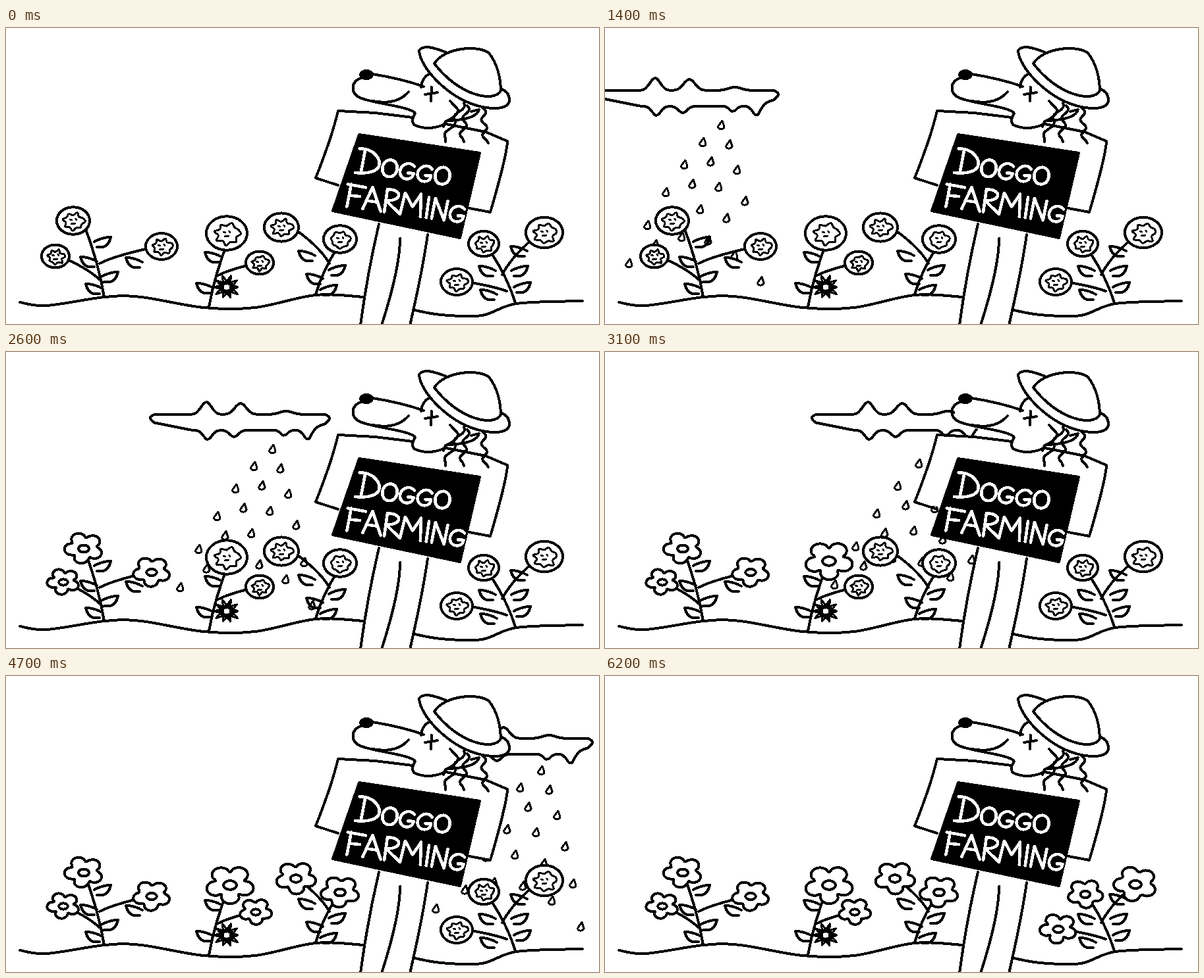
Recreate the animation shown at these times as an HTML page. Size 900 by 450 pixels, loop 6300 ms.

```html
<!DOCTYPE html>
<html lang="en">
<head>
<meta charset="utf-8">
<title>Doggo Farming</title>
<style>
  html, body { margin: 0; width: 100%; height: 100%; overflow: hidden; background: #fff; }
  svg { display: block; width: 900px; height: 450px; shape-rendering: crispEdges; }
  path, ellipse { fill: none; stroke: #000; stroke-width: 4; stroke-linecap: round; stroke-linejoin: round; }
  .paper { fill: #fff; }
  .blank { fill: #fff; stroke: none; }
  .ink { fill: #000; }
  .thin { stroke-width: 3; }
  .chalk { stroke: #fff; stroke-width: 4.6; vector-effect: non-scaling-stroke; }
</style>
</head>
<body>
<svg viewBox="0 0 900 450" role="img" aria-label="Doggo Farming">
  <g id="cloud"></g>
  <g id="rainA"></g>
  <g id="rainB"></g>
  <g id="field"></g>
  <g id="dog">
    <!-- legs -->
    <path class="blank" d="M566 298L640 314L613 452H538Z"/>
    <path d="M566 298Q548 375 538 452M598 320Q598 365 570 452M640 314Q632 370 613 452"/>
    <!-- shirt and head -->
    <path class="blank" d="M547 71L634 86L668 50L728 122V158L761 172L735 280L470 228L504 126L617 136L540 107Q518 90 547 71Z"/>
    <path d="M617 136L560 129L504 126Q495 165 470 228L504 239M668 146L728 158L761 172Q760 195 735 280L703 274"/>
    <path d="M540 76C522 80 522 102 540 107C560 115 617 120 621 130Q614 140 619 147Q640 157 664 147"/>
    <path d="M556 70Q600 77 634 89M630 90Q631 76 642 70M556 111Q593 118 611 97M636 101L655 98M646 90L645 111"/>
    <ellipse class="ink" cx="547" cy="71" rx="9" ry="6"/>
    <!-- ear and hair -->
    <path d="M674 111L687 125Q683 136 667 142L664 150M706 127L718 124Q714 139 672 141"/>
    <g id="hair"></g>
    <!-- hat -->
    <path class="paper" d="M668 37C650 30 634 25 627 34C628 60 670 105 715 118C745 126 765 122 764 108Q763 96 750 92"/>
    <path class="paper" d="M650 54C665 30 715 25 733 38Q750 60 751 95C742 114 688 104 650 54Z"/>
    <path class="ink" d="M536 162L719 190L689 319L496 278Z"/>
    <g id="sign"></g>
  </g>
</svg>
<script>
const FRAME = 100, FRAMES = 63, SPEED = 19;
const $ = id => document.getElementById(id);
const path = (d, cls = '') => `<path class="${cls}" d="${d}"/>`;
const oval = (x, y, rx, ry, cls = '') => `<ellipse class="${cls}" cx="${x}" cy="${y}" rx="${rx}" ry="${ry}"/>`;

let seed = 7;
const random = () => (seed = seed * 16807 % 2147483647) / 2147483647;

// Smooth curve through the given points
function curve(p, cls, closed) {
  const n = p.length;
  const at = i => closed ? p[(i + n) % n] : p[Math.max(0, Math.min(n - 1, i))];
  let d = 'M' + p[0];
  for (let i = 0; i < (closed ? n : n - 1); i++) {
    const [a, b, c, e] = [at(i - 1), at(i), at(i + 1), at(i + 2)];
    const c1 = b.map((v, k) => v + (c[k] - a[k]) / 6);
    const c2 = c.map((v, k) => v - (e[k] - b[k]) / 6);
    d += `C${c1} ${c2} ${c}`;
  }
  return path(d + (closed ? 'Z' : ''), cls);
}

// Points around an oval whose radius varies
const ring = (x, y, rx, ry, steps, radius) => Array.from({ length: steps }, (_, i) => {
  const a = i / steps * 2 * Math.PI, r = radius(a, i);
  return [x + rx * r * Math.cos(a), y + ry * r * Math.sin(a)];
});

// Cloud: two edges with soft bumps
function cloud() {
  const bump = (x, mid, width) => Math.exp(-(((x - mid) / width) ** 2));
  const top = x => 95 - 19 * bump(x, 171, 11) - 17 * bump(x, 223, 12) - 5 * bump(x, 292, 14);
  const bottom = x => 107 + 12 * Math.min(1, (x - 90) / 60, (356 - x) / 30) +
    14 * bump(x, 173, 9) + 10 * bump(x, 213, 9) + 8 * bump(x, 289, 7) + 14 * bump(x, 325, 8);
  const upper = [], lower = [];
  for (let x = 92; x < 356; x += 5) {
    upper.push([x, top(x)]);
    lower.unshift([x, bottom(x)]);
  }
  return curve([[86, 100], ...upper, [358, 101], ...lower], 'paper', true);
}

// Rain: slanting rows that fall apart on the way down
function rain(x0, y0, step) {
  let out = '';
  for (let row = 0; row < 6; row++) {
    for (let i = 0; i < 6 - row; i++) {
      const x = x0 + 12 * row - step * i;
      const y = y0 + 25 * row + 4.5 * row * row + 22 * i + 4 * i * i;
      out += path(`M${x + 2} ${y - 6}l-6 8c-2 6 9 6 9 1z`, 'thin');
    }
  }
  return out;
}

// Bud x, y, radius; open flower x, y; foot of the stem x, y
const flowers = [
  [102, 293, 25, 118, 298, 149, 409],
  [75, 347, 21, 87, 349, 147, 387],
  [236, 332, 24, 221, 334, 142, 358],
  [335, 312, 31, 340, 317, 308, 424],
  [385, 357, 21, 379, 358, 322, 376],
  [418, 303, 26, 440, 307, 491, 358],
  [507, 321, 25, 507, 328, 470, 405],
  [725, 328, 23, 729, 331, 773, 418],
  [684, 386, 24, 688, 384, 760, 400],
  [817, 311, 28, 805, 316, 753, 375]
];
const opensAt = x => Math.floor(13 + x / SPEED);

const stem = ([, , , x, y, fx, fy]) => path(`M${x},${y}Q${x * 0.3 + fx * 0.7},${(y + fy) / 2} ${fx},${fy}`);

function bud([x, y, r]) {
  const scribble = ring(x + 1, y + 1, r, r * 0.83, 15, (a, i) => (i % 2 ? 0.42 : 0.58) + 0.12 * random());
  return oval(x, y, r, r * 0.83, 'paper') + curve(scribble, 'thin', true) +
    path(`M${x - 5},${y - 2}l3,1M${x + 4},${y - 3}l1,2M${x - 3},${y + 5}l6,-1`, 'thin');
}

function bloom([, , r, x, y]) {
  const turn = random();
  const petals = a => 0.7 + 0.48 * Math.abs(Math.sin(2.5 * a + turn)) ** 0.7;
  return curve(ring(x, y, r, r * 0.8, 40, petals), 'paper', true) + oval(x, y + 1, r * 0.32, r * 0.22);
}

const leaf = side => ([x, y]) =>
  path(`M${x},${y}q${12 * side},-7 ${25 * side},-7q${-4 * side},18 ${-21 * side},15`);
const leftLeaves = [[138, 355], [207, 356], [146, 396], [327, 348], [314, 395], [469, 346],
  [481, 381], [791, 339], [743, 369], [745, 405]];
const rightLeaves = [[134, 325], [145, 378], [490, 368], [477, 398], [767, 369], [771, 394]];

const ground = [
  [[21, 417], [62, 422], [150, 409], [205, 409], [300, 425], [378, 425], [470, 406], [543, 409]],
  [[616, 428], [660, 436], [722, 437], [775, 419], [875, 415]]
];

const weed = size => path('M' + ring(335, 394, size, size * 0.9, 20, (a, i) => i % 2 ? 0.5 : 0.85 + 0.2 * random()).join('L') + 'Z', 'thin');

// Wavy strand of hair
function strand(x0, y0, x1, y1) {
  return curve(Array.from({ length: 13 }, (_, i) => {
    const t = i / 12;
    return [x0 + (x1 - x0) * t + 4 * Math.sin(t * 4.5 * Math.PI), y0 + (y1 - y0) * t];
  }));
}

// Chalk letters: advance and strokes, capitals ten units high
const glyphs = {
  D: [11.2, 'M3-10L2.5 0M.5-10.5C7-11.5 10.5-7 10-4C9-1 5 0 0 .3'],
  O: [7.8, 'M3.6-7.5C-.8-7-.5 0 3.5 0C8 0 8-7.5 3.6-7.5'],
  G: [7.8, 'M6.5-6C4-8.5 0-6 .5-2.5C1.5 1 6.5 .5 6.5-3L4-2.8'],
  F: [8, 'M1.5-10L1 0M0-9.8L8-9.5M1.2-5L6-5.2'],
  A: [8.6, 'M0 0L3-10L8 0M1.5-3.8H6'],
  R: [8, 'M1-10V0M1-10C8-11 8-5.5 1-5L8 0'],
  M: [10.6, 'M0 0L1-9.5L5-4L8-10L9 0'],
  I: [3.4, 'M1-9V0'],
  N: [7.3, 'M0 0L.5-9L5.5 0L6-8.5']
};
function chalk(word, x, y) {
  let pen = 0;
  const letters = [...word].map(c => {
    const [advance, d] = glyphs[c];
    const g = `<g transform="translate(${pen})">${path(d, 'chalk')}</g>`;
    pen += advance;
    return g;
  });
  return `<g transform="translate(${x} ${y}) rotate(8) scale(3.45)">${letters.join('')}</g>`;
}

$('cloud').innerHTML = cloud();
$('rainA').innerHTML = rain(62, 147, 28);
$('rainB').innerHTML = rain(280, 143, 32);
$('field').innerHTML = ground.map(p => curve(p)).join('') + flowers.map(stem).join('') +
  leftLeaves.map(leaf(-1)).join('') + rightLeaves.map(leaf(1)).join('') + weed(20) + weed(11) +
  flowers.map((f, i) => `<g id="bud${i}">${bud(f)}</g><g id="bloom${i}">${bloom(f)}</g>`).join('');
$('hair').innerHTML = strand(695, 114, 663, 173) + strand(700, 118, 691, 173) + strand(724, 122, 728, 175);
$('sign').innerHTML = chalk('DOGGO', 530, 219) + chalk('FARMING', 514, 271);

// Timeline
const show = (id, on) => $(id).setAttribute('visibility', on ? 'visible' : 'hidden');
const shift = (id, frames) => $(id).setAttribute('transform', `translate(${SPEED * frames})`);

function draw(n) {
  shift('cloud', n - 19);
  shift('rainA', n - 8);
  shift('rainB', n - 19);
  show('rainA', n % 2 === 0);
  show('rainB', n % 2 === 1);
  flowers.forEach(([x], i) => {
    const open = n >= opensAt(x);
    show('bud' + i, !open);
    show('bloom' + i, open);
  });
}

let start;
function tick(now) {
  start ??= now;
  draw(Math.floor((now - start) / FRAME + 0.001) % FRAMES);
  requestAnimationFrame(tick);
}
draw(0);
requestAnimationFrame(tick);
</script>
</body>
</html>
```
